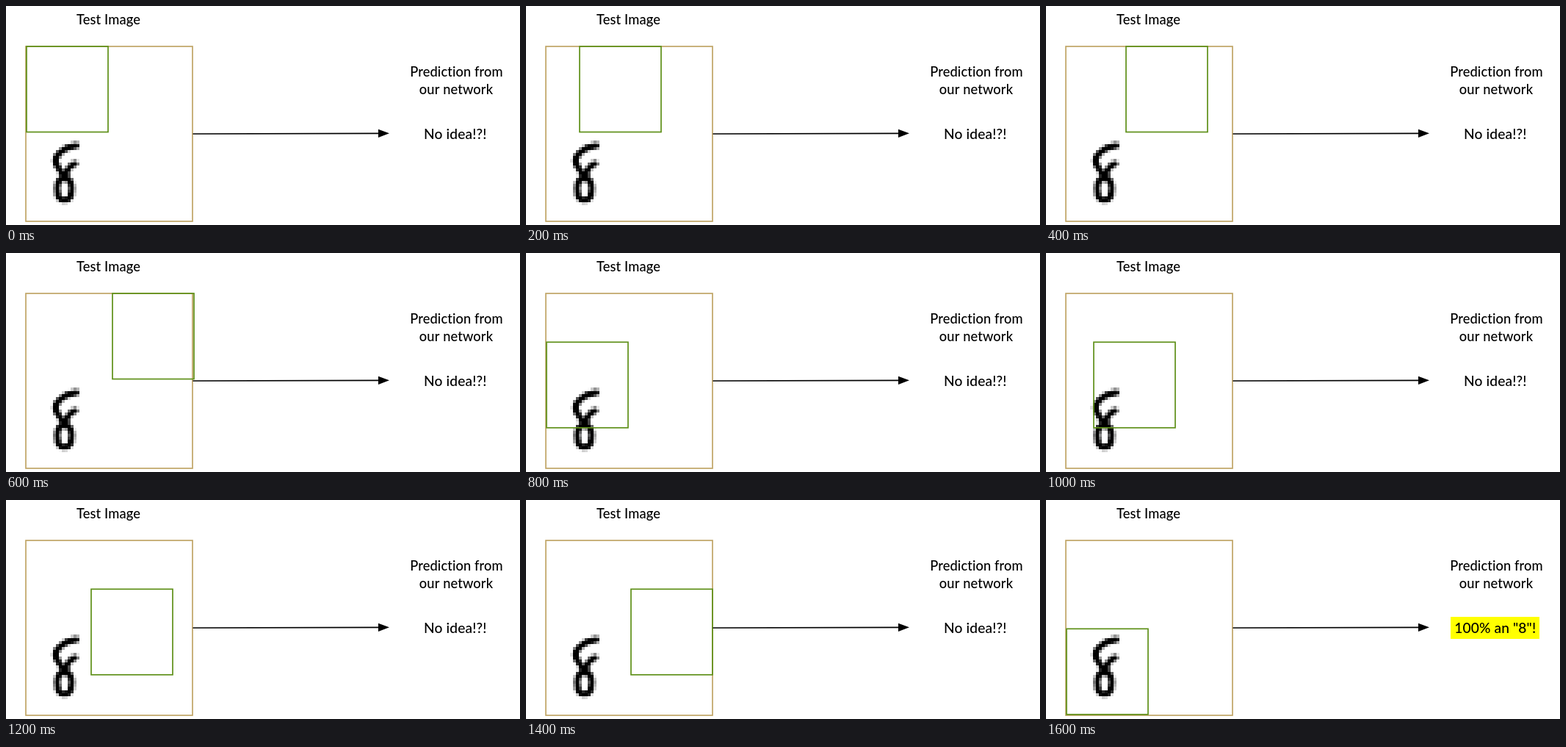
These frames come from a looping animation (700 px wide and 298 px high, 2.6 s). An HTML page with a canvas:

```html
<!DOCTYPE html>
<html lang="en">
<head>
<meta charset="utf-8">
<title>Sliding window</title>
<style>
html, body { margin: 0; width: 100%; height: 100%; overflow: hidden; background: #fff; }
canvas { display: block; }
</style>
</head>
<body>
<canvas id="stage" width="700" height="298"></canvas>
<script>
const ctx = document.getElementById('stage').getContext('2d');
const LOOP = 2600, STEP = 200, PER_ROW = 4, LAST = 8;
const BOX = { w: 111, h: 116.5 };
const rowY = [55, 121.3, 175.3];

// The window scans two rows of four stops, then settles on the digit.
function windowAt(i) {
  const row = Math.floor(i / PER_ROW), col = i % PER_ROW;
  const y = rowY[row];
  if (col === 0) return [28, y];
  return row === 0 ? [37 + 36 * col, y] : [26 + 39 * col + (col === 2 ? 12 : 0), y];
}

// Pen strokes on a 28 x 28 grid, enlarged to the size of the window.
function makeDigit() {
  const grid = document.createElement('canvas');
  grid.width = grid.height = 28;
  const g = grid.getContext('2d');
  g.lineWidth = 2;
  g.lineCap = 'round';
  g.stroke(new Path2D('M17 3.6 C13 4 7.5 7 11 11 L13 14 M16.6 9.4 Q14 10 13 14'));
  g.beginPath();
  g.ellipse(12.9, 17.6, 2.5, 3.7, 0, 0, Math.PI * 2);
  g.stroke();
  return grid;
}
const digit = makeDigit();

function drawDigit() {
  ctx.save();
  ctx.imageSmoothingEnabled = false;
  ctx.filter = 'blur(0.7px)';
  ctx.drawImage(digit, 28, 175, 112, 117);
  ctx.restore();
}

function outline(x, y, w, h, color) {
  ctx.strokeStyle = color;
  ctx.lineWidth = 1.7;
  ctx.strokeRect(x, y, w, h);
}

function arrow() {
  ctx.strokeStyle = ctx.fillStyle = '#000';
  ctx.lineWidth = 1.7;
  ctx.beginPath();
  ctx.moveTo(254.5, 174);
  ctx.lineTo(508, 173.3);
  ctx.stroke();
  ctx.beginPath();
  ctx.moveTo(522, 173.3);
  ctx.lineTo(507, 167.7);
  ctx.lineTo(507, 179);
  ctx.fill();
}

function label(text, x, y, size = 18.3) {
  ctx.font = `500 ${size}px Lato, "Open Sans", sans-serif`;
  ctx.fillText(text, x, y);
}

function draw(t) {
  const i = Math.min(LAST, Math.floor(t / STEP));
  const found = i === LAST;

  ctx.fillStyle = '#fff';
  ctx.fillRect(0, 0, 700, 298);
  drawDigit();
  outline(27, 55, 227, 238, '#c0a566');
  outline(...windowAt(i), BOX.w, BOX.h, '#5e9018');
  arrow();

  if (found) {
    ctx.fillStyle = '#ff0';
    ctx.fillRect(551, 159, 121, 30);
  }
  ctx.textAlign = 'center';
  ctx.letterSpacing = '0.1px';
  ctx.fillStyle = '#000';
  label('Test Image', 139.5, 25);
  label('Prediction from', 613.5, 96);
  label('our network', 613, 119.5);
  label(found ? '100% an "8"!' : 'No idea!?!', 611.8, 181, 19.2);
}

const start = performance.now();
function tick() {
  draw((performance.now() - start) % LOOP);
  requestAnimationFrame(tick);
}
tick();
</script>
</body>
</html>
```
